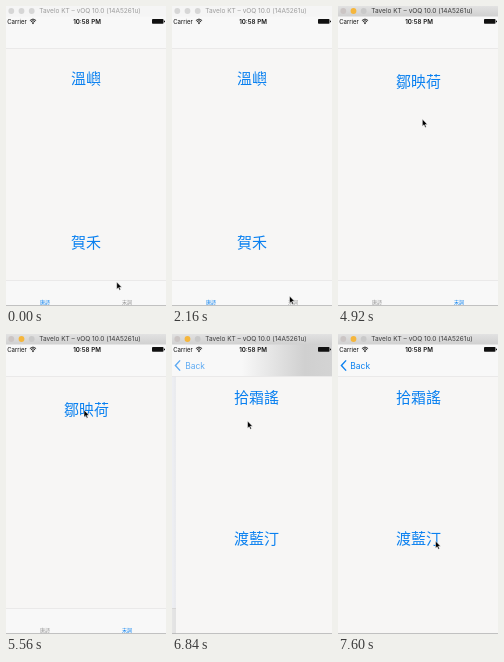
An HTML page that plays this animation: 160 px wide and 300 px high, repeating every 8 s.

```html
<!DOCTYPE html>
<html lang="zh-Hant">
<head>
<meta charset="utf-8">
<title>Poets</title>
<style>
  html, body { margin: 0; width: 100%; height: 100%; overflow: hidden; background: #f7f6f5; }
  svg { display: block; width: 100vw; height: 100vh; }
  text { font-family: Inter, "Liberation Sans", sans-serif; }
  .mid { text-anchor: middle; }
  .zh { font-family: "Noto Sans CJK TC", "Noto Sans CJK", sans-serif; text-anchor: middle; }
  .link { font-size: 15px; fill: #0a80f0; }
  .tab { font-size: 5px; }
  .page { fill: #f7f6f5; }
  .bar { fill: #f8f8f8; }
  .line { fill: #e8e7e6; }
</style>
</head>
<body>
<svg viewBox="0 0 160 300">
  <defs>
    <linearGradient id="edge">
      <stop offset="0" stop-color="#000" stop-opacity="0"/>
      <stop offset="1" stop-color="#000" stop-opacity=".16"/>
    </linearGradient>
    <linearGradient id="haze">
      <stop offset="0" stop-color="#777" stop-opacity="0"/>
      <stop offset=".7" stop-color="#777" stop-opacity="1"/>
      <stop offset="1" stop-color="#777" stop-opacity=".9"/>
    </linearGradient>
    <linearGradient id="chrome" x2="0" y2="1">
      <stop offset="0" stop-color="#e2e2e2"/>
      <stop offset="1" stop-color="#d0d0d0"/>
    </linearGradient>
  </defs>

  <rect class="page" width="160" height="300"/>
  <g id="root">
    <rect class="page" y="42" width="160" height="258"/>
    <g id="first">
      <text class="zh link" x="80" y="77.6">溫嶼</text>
      <text class="zh link" x="80" y="241.8">賀禾</text>
    </g>
    <text id="second" class="zh link" x="80.5" y="81.2">鄒映荷</text>
    <rect class="bar" y="274" width="160" height="26"/>
    <rect class="line" y="274" width="160" height=".8"/>
    <text id="tabA" class="zh tab" x="39" y="298.2">唐詩</text>
    <text id="tabB" class="zh tab" x="121" y="298.2">宋詞</text>
  </g>
  <g id="dim">
    <rect y="42" width="160" height="232" fill="#e4e9f2" fill-opacity=".4"/>
    <rect y="274" width="160" height="26" fill-opacity=".07"/>
  </g>

  <g id="detail">
    <rect id="shade" x="-5" y="42" width="5" height="258" fill="url(#edge)"/>
    <rect class="page" y="42" width="160" height="258"/>
    <text class="zh link" x="80.5" y="69.3">拾霜謠</text>
    <text class="zh link" x="80.5" y="210.3">渡藍汀</text>
  </g>

  <rect class="bar" y="10" width="160" height="32"/>
  <rect id="fog" y="10" height="32" fill="url(#haze)"/>
  <rect class="line" y="42" width="160" height=".8"/>
  <g id="back">
    <path d="M8.1 26.4 3.4 31.5l4.7 5.1" fill="none" stroke="#0a80f0" stroke-width="1.4"/>
    <text id="label" x="12.2" y="34.7" font-size="8.5" fill="#0a80f0">Back</text>
  </g>

  <g fill="#111">
    <text x="1.2" y="17.7" font-size="6">Carrier</text>
    <text class="mid" x="81" y="17.7" font-size="6.2" font-weight="600">10:58 PM</text>
    <path d="M27 18.2 25.7 16.8a1.9 1.9 0 0 1 2.6 0z"/>
    <path d="M24.9 15.7a3 3 0 0 1 4.2 0M23.9 14.5a4.5 4.5 0 0 1 6.2 0" fill="none" stroke="#111" stroke-width=".9"/>
    <rect x="146" y="13" width="11.5" height="4.8" rx=".8"/>
    <rect x="158" y="14.5" width="1" height="1.8" rx=".4"/>
  </g>

  <rect id="title" width="160" height="10.5"/>
  <g id="lights">
    <circle cx="5.3" cy="5" r="2.9"/>
    <circle cx="15.5" cy="5" r="2.9"/>
    <circle cx="25.7" cy="5" r="2.9"/>
  </g>
  <text id="name" class="mid" x="84" y="7.4" font-size="6.5">Tavelo KT – vOQ 10.0 (14A5261u)</text>
  <rect y="299.2" width="160" height=".8" fill="#b4b4b4"/>

  <path id="cursor" d="M0 0V7.2L1.7 5.7 2.8 8.3 4 7.8 2.9 5.3H5.1Z" fill="#000" stroke="#fff" stroke-width=".5"/>
</svg>
<script>
const LOOP = 8000, STEP = 40, WIDTH = 160;
const ACTIVE = 2480, SWITCH = 2760, PRESS = 5840, PUSH = 6102, DONE = 6960;
const BLUE = '#0a80f0', GRAY = '#929292';
const $ = id => document.getElementById(id);
const clamp = v => Math.min(1, Math.max(0, v));
const set = (id, attrs) => {
  for (const k in attrs) $(id).setAttribute(k, attrs[k]);
};
const show = (id, on) => set(id, { visibility: on ? 'visible' : 'hidden' });

const linear = p => p;
const easeIn = p => p * p;
const easeOut = n => p => 1 - (1 - p) ** n;
const easeBoth = p => p * p * (3 - 2 * p);

// start, end, target x, target y, easing
const moves = [
  [1120, 1920, 116, 290, easeBoth],
  [1960, 2160, 117.5, 290, linear],
  [3800, 4360, 89.5, 143.5, easeBoth],
  [4720, 5560, 78, 76, easeOut(2.2)],
  [6640, 6840, 75.5, 87, easeIn],
  [6840, 7600, 97.5, 207, easeOut(1.6)]
];

function cursorAt(t) {
  let x = 110.7, y = 276;
  for (const [a, b, tx, ty, ease] of moves) {
    const p = ease(clamp((t - a) / (b - a)));
    x += (tx - x) * p;
    y += (ty - y) * p;
  }
  return `translate(${x} ${y})`;
}

// critically damped spring, 1 to 0
const spring = ms => ms <= 0 ? 1 : (1 + ms * .00757) * Math.exp(-ms * .00757);

function render(t) {
  const active = t >= ACTIVE, song = t >= SWITCH;
  const since = t - PUSH, pushing = since > 0, done = t >= DONE;
  const rest = spring(since), x = WIDTH * rest;

  set('title', { fill: active ? 'url(#chrome)' : '#f5f5f5' });
  set('name', { fill: active ? '#3c3c3c' : '#9c9c9c' });
  const lights = active ? ['#cbc5c4', '#f5b63c', '#c9c9c9'] : ['#d6d6d6', '#d6d6d6', '#d6d6d6'];
  [...$('lights').children].forEach((c, i) => c.setAttribute('fill', lights[i]));

  show('first', !song);
  show('second', song);
  set('tabA', { fill: song ? GRAY : BLUE });
  set('tabB', { fill: song ? BLUE : GRAY });
  set('second', { opacity: t < PRESS ? 1 : .2 + .8 * clamp(since / 470) });

  set('root', { transform: `translate(${-.3 * (WIDTH - x)} 0)` });
  set('dim', { opacity: 1 - rest });
  show('detail', pushing);
  set('detail', { transform: `translate(${x} 0)` });
  show('shade', pushing && !done);
  set('shade', { opacity: .15 + .85 * rest });

  const left = 125 - (since - 218) * .106;
  show('fog', pushing && !done);
  set('fog', {
    x: left,
    width: Math.max(0, WIDTH - left),
    opacity: clamp(since / 100) * (.57 - since * .00035)
  });
  show('back', pushing);
  set('back', { opacity: done ? 1 : clamp((since - 250) / 750) });
  set('label', { transform: `translate(${x * .25} 0)` });
  set('cursor', { transform: cursorAt(t) });
}

const start = performance.now();
function tick() {
  const t = (performance.now() - start) % LOOP;
  render(Math.floor(t / STEP) * STEP);
  requestAnimationFrame(tick);
}
tick();
</script>
</body>
</html>
```
